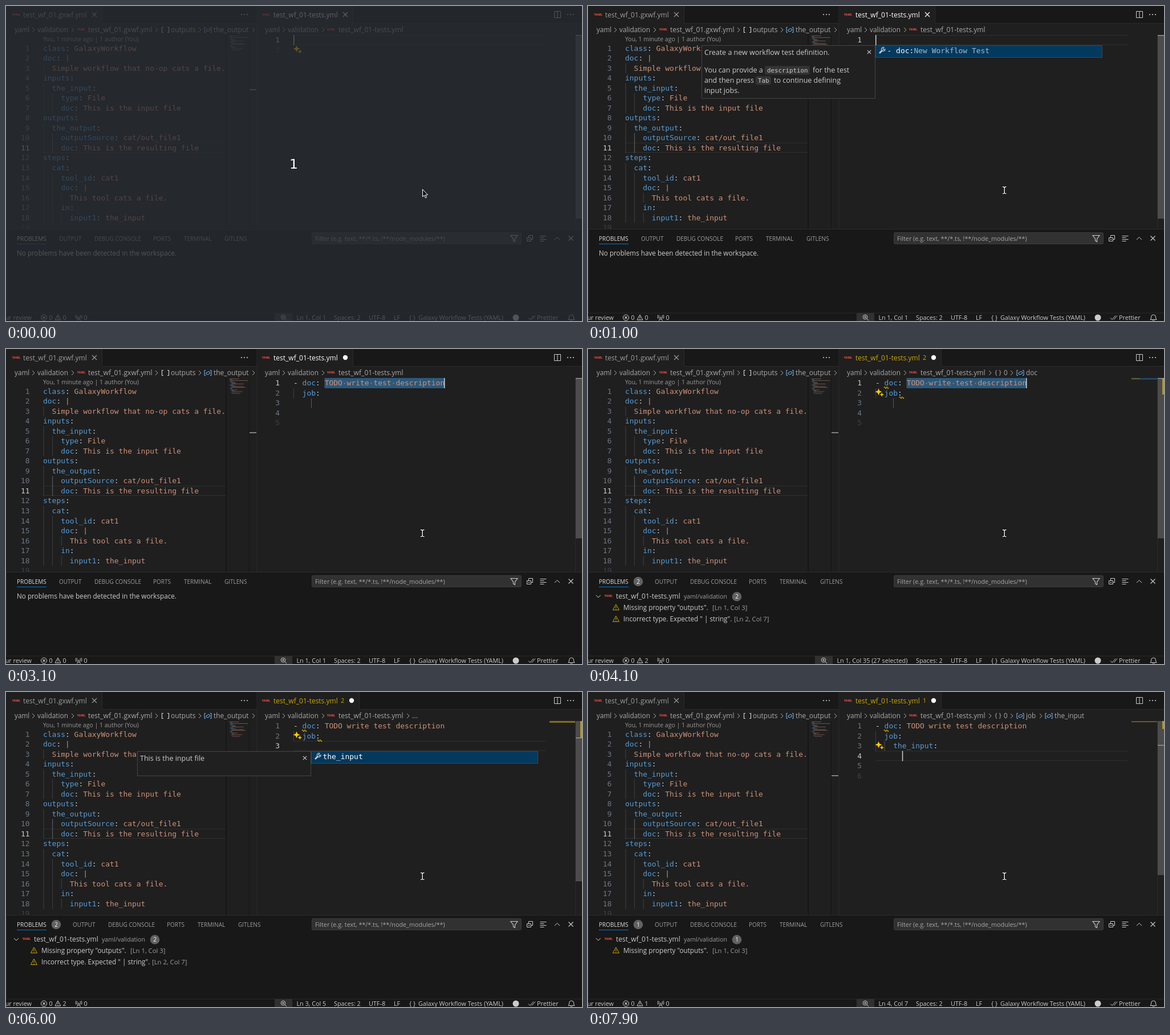
Animation, 1010 px wide and 554 px high, one loop 8000 ms. Source, as an HTML page:

```html
<!DOCTYPE html>
<html lang="en">
<head>
<meta charset="utf-8">
<title>Workflow test editing</title>
<style>
html, body { margin: 0; width: 100%; height: 100%; overflow: hidden; background: #1f1f1f; }
svg { display: block; width: 1010px; height: 554px; }
text { white-space: pre; }
</style>
</head>
<body>
<svg id="stage" viewBox="0 0 1010 554"></svg>
<script>
const LOOP = 8000;
const UI = "'Open Sans', sans-serif", MONO = "'DejaVu Sans Mono', monospace";
const FG = '#cccccc', DIM = '#9d9d9d', CRUMB = '#a9a9a9', BLUE = '#569cd6', STR = '#ce9178', WARN = '#cca700';
const CHAR = 7.8, ROW = 17.53;
const timed = [];
let cur = document.getElementById('stage');

function el(tag, attrs) {
  const e = document.createElementNS('http://www.w3.org/2000/svg', tag);
  for (const k in attrs) e.setAttribute(k, attrs[k]);
  cur.appendChild(e);
  return e;
}
// Group shown only inside the given [start, end, start, end, ...] spans.
function during(spans, build) {
  const outer = cur;
  cur = el('g', {});
  timed.push([cur, spans]);
  build();
  cur = outer;
}
const rect = (x, y, w, h, fill, more) => el('rect', { x, y, width: w, height: h, fill, ...more });
const line = (d, stroke = FG, width = 1, more) => el('path', { d, stroke, fill: 'none', 'stroke-width': width, ...more });
const dot = (x, y, r, fill) => el('circle', { cx: x, cy: y, r, fill });
// y is the middle of the capitals
function text(x, y, s, fill = FG, size = 11.7, more) {
  const e = el('text', { x, y: Math.floor(y + size * .36), fill, 'font-size': size, 'font-family': UI, ...more });
  e.textContent = s;
  return e;
}
const mono = (x, y, s, fill, size = 12.96, more) => text(x, y, s, fill, size, { 'font-family': MONO, ...more });

function code(x, y, s) {
  const e = mono(x, y, '', FG);
  const m = s.match(/^(\s*(?:- )?)(\w+)(:)(.*)$/);
  const parts = m ? [[m[1], FG], [m[2], BLUE], [m[3], FG], [m[4], STR]] : [[s, STR]];
  for (const [str, fill] of parts) {
    const span = document.createElementNS(e.namespaceURI, 'tspan');
    span.setAttribute('fill', fill);
    span.textContent = str;
    e.appendChild(span);
  }
}

// Icons
const chevron = (x, y, c = CRUMB) => line(`M${x - 2} ${y - 4}l4 4l-4 4`, c);
const cross = (x, y, c = FG, r = 4) => line(`M${x - r} ${y - r}l${2 * r} ${2 * r}m0 ${-2 * r}l${-2 * r} ${2 * r}`, c, 1.1);
const dots = (x, y, c = FG) => [-5, 0, 5].forEach(d => dot(x + d, y, 1.1, c));
const yaml = (x, y) => text(x, y, 'YAML', '#d8483e', 5, { 'text-anchor': 'middle', 'font-weight': 800 });
const triangle = (x, y, c, r = 5.5) => {
  line(`M${x} ${y - r}l${r} ${2 * r - 1}h${-2 * r}z`, c, 1, { 'stroke-linejoin': 'round' });
  line(`M${x} ${y - 2}v3.4m0 1v1.2`, c);
};
const badge = (x, y, n) => {
  dot(x, y, 8.3, '#616161');
  text(x, y + .4, n, '#f8f8f8', 10, { 'text-anchor': 'middle' });
};
const symbol = (x, y) => {
  line(`M${x - 4} ${y - 4.5}h-2v9h2m8 -9h2v9h-2`, '#75beff');
  line(`M${x - 3} ${y}l4 -2.5l2.5 1v2.5l-4 2l-2.5 -1z`, '#75beff');
};
const star = (x, y, r) => {
  const q = r * .28;
  el('path', { fill: '#ffcc00', d: `M${x} ${y - r}l${q} ${r - q}l${r - q} ${q}l${q - r} ${q}l${-q} ${r - q}l${-q} ${q - r}l${q - r} ${-q}l${r - q} ${-q}z` });
};
const sparkle = y => { star(509.5, y - 1.3, 6); star(515.3, y + 3.8, 3.8); };
const squiggle = (x, y) => line(`M${x} ${y}q1 -3 2 0t2 0t2 0t2 0`, WARN, 1.2);
const zoom = x => {
  rect(x, 540, 31, 14, '#313131');
  el('circle', { cx: x + 15, cy: 547, r: 3.8, stroke: FG, fill: 'none' });
  line(`M${x + 18} 550l3 3m-8 -6h4m-2 -2v4`);
};

function popup(x, y, docHeight, drawRow, drawDoc) {
  rect(x + .5, y + .5, 397, 21, '#04395e', { stroke: '#454545' });
  line(`M${x + 7} ${y + 14}l5 -5`, FG, 2.6);
  line(`M${x + 15} ${y + 4}a3.3 3.3 0 1 0 2 3l-2.5 1l-1.5 -1.5z`, FG, 1.2);
  drawRow();
  rect(x - 304.5, y + .5, 304, docHeight - 1, '#202020', { stroke: '#454545' });
  drawDoc(x - 300, y + 13);
  cross(x - 11, y + 12, FG, 3.2);
}
const docText = (x, y, s) => text(x, y, s, FG, 12.5);

// Left editor
const source = `class: GalaxyWorkflow
doc: |
  Simple workflow that no-op cats a file.
inputs:
  the_input:
    type: File
    doc: This is the input file
outputs:
  the_output:
    outputSource: cat/out_file1
    doc: This is the resulting file
steps:
  cat:
    tool_id: cat1
    doc: |
      This tool cats a file.
    in:
      input1: the_input`.split('\n');

const lineNo = (x, y, n, fill) => mono(x, y, n, fill, 12.96, { 'text-anchor': 'end' });

rect(0, 0, 1010, 554, '#1f1f1f');
rect(0, 0, 1010, 30, '#181818');
rect(0, 30, 1010, 1, '#2b2b2b');
rect(0, 0, 168, 31, '#1f1f1f');
rect(168, 0, 1, 31, '#2b2b2b');
yaml(18, 16);
text(30, 16, 'test_wf_01.gxwf.yml', DIM, 12);
cross(155, 15, DIM);
dots(418, 15);

text(15, 42, 'yaml', CRUMB);
text(55, 42, 'validation', CRUMB, 11.85);
yaml(132, 42);
text(144, 42, 'test_wf_01.gxwf.yml', CRUMB, 12.1);
line('M276 37.5h-2.5v9h2.5m7 -9h2.5v9h-2.5', FG, 1.2);
text(289, 42, 'outputs', CRUMB, 12);
symbol(354, 42);
text(364, 42, 'the_output', CRUMB, 12);
[48, 117, 264, 340, 434].forEach(x => chevron(x, 42));
text(65, 58.5, 'You, 1 minute ago | 1 author (You)', '#999999', 10.5);

rect(65, 240.5, 320, 1, '#303030');
rect(65, 257, 320, 1, '#303030');
source.forEach((s, i) => {
  const y = 74.5 + i * ROW, indent = s.search(/\S/);
  for (let k = 0; k < indent; k += 2)
    rect(65.5 + k * CHAR, y - ROW / 2, 1, ROW, k == 2 && (i == 9 || i == 10) ? '#666666' : '#404040');
  code(65, y, s);
  lineNo(41.5, y, i + 1, i == 10 ? FG : '#6e7681');
  rect(392 + indent * .8, 52 + i * 1.5, (s.length - indent) * .8, 1, s.includes(': ') || !s.includes(':') ? STR : BLUE, { opacity: .45 });
});
lineNo(41.5, 74.5 + 18 * ROW, 19, '#3c4046');
rect(385, 51, 2, 341, '#161616');
rect(426, 51, 1, 341, '#151515');
rect(427, 146.5, 12, 1.5, '#a0a0a0');
rect(439.5, 0, 1, 392, '#2b2b2b');

// Right editor
const rowY = n => 60 + (n - 1) * ROW;

function tab(right, color, count) {
  rect(440, 0, right - 440, 31, '#1f1f1f');
  rect(right, 0, 1, 31, '#2b2b2b');
  yaml(456, 16);
  text(469, 16, 'test_wf_01-tests.yml', color, 12);
  if (count) text(587, 16, count, color, 11);
}
during([0, 3100], () => { tab(608, '#ffffff'); cross(595, 15, '#ffffff'); });
during([3100, 3200], () => { tab(608, '#ffffff'); dot(595, 15, 4.2, '#ffffff'); });
during([3200, 7100], () => { tab(619, WARN, 2); dot(606, 15, 4.2, '#ffffff'); });
during([7100, LOOP], () => { tab(619, WARN, 1); dot(606, 15, 4.2, '#ffffff'); });
line('M961.5 9.5h11v11h-11zm5.5 0v11');
dots(990, 15);

text(454, 42, 'yaml', CRUMB);
text(494, 42, 'validation', CRUMB, 11.85);
yaml(570, 42);
text(583, 42, 'test_wf_01-tests.yml', CRUMB, 12.1);
chevron(487, 42);
chevron(556, 42);
during([3200, LOOP], () => chevron(705, 42));
during([3200, 3700, 4600, 7600], () => text(712, 42, '…', CRUMB, 13));
during([3700, 4600, 7600, LOOP], () => {
  text(719, 41.5, '{ }', CRUMB, 11.5, { 'text-anchor': 'middle' });
  text(729, 42, '0', CRUMB);
  chevron(743, 42);
  symbol(758, 42);
});
during([3700, 4600], () => text(768, 42, 'doc', CRUMB));
during([7600, LOOP], () => {
  text(768, 42, 'job', CRUMB);
  chevron(794, 42);
  symbol(808, 42);
  text(818, 42, 'the_input', CRUMB, 11.8);
});

// [active row, last row, spans]
[[1, 2, [0, 3100]], [1, 5, [3100, 4500]], [3, 5, [4500, 7400]], [4, 6, [7400, LOOP]]].forEach(([active, last, spans]) =>
  during(spans, () => {
    for (let n = 1; n <= last; n++)
      lineNo(480, rowY(n), n, n == active ? FG : n == last ? '#3c4046' : '#6e7681');
    if (last == 5 && active == 1) return;
    rect(504, rowY(active) - 9, 442, 1, '#303030');
    rect(504, rowY(active) + 7.5, 442, 1, '#303030');
  }));

during([3100, 4500], () => {
  rect(558.5, 51, 210, 18, '#2d587a');
  rect(535, 87, 1, 17, '#5a5a5a');
});
during([3100, LOOP], () => {
  rect(504, 69, 1, ROW, '#404040');
  code(504, rowY(1), '- doc: TODO write test description');
  code(504, rowY(2), '  job:');
});
during([3100, 4500], () => [11, 17, 22].forEach(c => dot(504 + (c + .5) * CHAR, 60.5, .9, '#8098a8')));
during([3200, LOOP], () => squiggle(519, 68));
during([3200, 7100], () => squiggle(546, 85.5));
during([6900, LOOP], () => {
  rect(504, 86.5, 1, ROW, '#404040');
  rect(519.5, 86.5, 1, ROW, '#505050');
});
during([6900, 7000], () => mono(504, rowY(3), '    the_input:', FG));
during([7000, LOOP], () => code(504, rowY(3), '    the_input:'));
during([0, 3100, 3200, 7200], () => sparkle(76.5));
during([7900, LOOP], () => sparkle(94));

// Minimap, scrollbar and ruler
during([3200, 4500], () => {
  rect(953, 51.5, 45, 2, '#2a597c');
  rect(953, 51.5, 14, 1, '#8c7714');
});
during([4500, 7100], () => rect(953, 51, 45, 3, '#80701a'));
during([7100, LOOP], () => rect(953, 51.5, 45, 1.5, '#80701a'));
rect(998, 51, 1, 341, '#2b2b2b');
[[374, [0, 3100]], [333, [3100, 7400]], [322, [7400, LOOP]]].forEach(([end, spans]) =>
  during(spans, () => rect(999, 51, 11, end - 51, '#4c4c4c')));
during([3200, 7100], () => rect(1007, 51, 3, 29, '#b99a12'));
during([7100, LOOP], () => rect(1007, 51, 3, 14, '#b99a12'));
[[51, [0, 4500]], [80, [4500, 7400]], [93, [7400, LOOP]]].forEach(([y, spans]) =>
  during(spans, () => rect(999, y, 11, 1.3, '#a0a0a0')));

// Carets
const caret = (col, row, spans) => during(spans, () => rect(504 + col * CHAR, rowY(row) - 9, 1.5, 18, '#d0d0d0'));
caret(0, 1, [0, 200, 600, 1200, 1600, 2100, 2600, 3100]);
caret(33.85, 1, [3100, 3600, 4100, 4500]);
caret(4, 3, [4500, 5000, 5500, 6000, 6500, 6900]);
caret(14, 3, [6900, 7400]);
caret(6, 4, [7400, LOOP]);

// Suggestions
during([1000, 3100], () => popup(504, 69, 94,
  () => {
    mono(524.5, 78.5, '- doc:', '#ffffff');
    mono(571.5, 78.5, 'New Workflow Test', '#a5b9c8');
  },
  (x, y) => {
    const chip = (cx, cy, w, s) => {
      rect(cx, cy - 8, w, 15, '#343434', { rx: 3 });
      mono(cx + 4, cy, s, FG, 10.8);
    };
    docText(x, y, 'Create a new workflow test definition.');
    docText(x, y + 31, 'You can provide a');
    chip(310, y + 31.5, 79, 'description');
    docText(394, y + 31, 'for the test');
    docText(x, y + 49, 'and then press');
    chip(294, y + 49.5, 27, 'Tab');
    docText(326, y + 49, 'to continue defining');
    docText(x, y + 67, 'input jobs.');
  }));
during([5800, 6900], () => popup(535, 104, 44,
  () => mono(555.5, 113.5, 'the_input', '#ffffff'),
  (x, y) => docText(x, y, 'This is the input file')));

// Panel
rect(0, 392, 1010, 162, '#181818');
rect(0, 392, 1010, 1, '#2b2b2b');
rect(0, 392, 1, 148, '#2b2b2b');
text(19, 409.5, 'PROBLEMS', '#dddddd', 10);
rect(19, 418, 52, 1, '#0078d4');
const panelTabs = xs => ['OUTPUT', 'DEBUG CONSOLE', 'PORTS', 'TERMINAL', 'GITLENS'].forEach((s, i) => text(xs[i], 409.5, s, DIM, 10));
during([0, 3200], () => {
  panelTabs([93, 155, 258, 312, 383]);
  text(19, 435, 'No problems have been detected in the workspace.');
});
during([3200, LOOP], () => {
  panelTabs([117, 179, 282, 336, 407]);
  line('M14 433l4 4l4 -4');
  yaml(36, 435);
  text(49, 435, 'test_wf_01-tests.yml', FG, 12);
  text(168, 435.3, 'yaml/validation', DIM, 10.6);
});
const problem = (y, s, x, at) => {
  triangle(49, y - .5, WARN);
  text(62, y, s);
  text(x, y, at, DIM, 11.3);
};
during([3200, LOOP], () => problem(455, 'Missing property "outputs".', 218, '[Ln 1, Col 3]'));
during([3200, 7200], () => problem(475.5, 'Incorrect type. Expected " | string".', 256, '[Ln 2, Col 7]'));
during([3200, 7200], () => { badge(88, 409, 2); badge(261, 435.5, 2); });
during([7200, LOOP], () => { badge(88, 409, 1); badge(261, 435.5, 1); });

rect(536.5, 398.5, 367, 20, '#313131', { rx: 2, stroke: '#3c3c3c' });
text(542, 409.2, 'Filter (e.g. text, **/*.ts, !**/node_modules/**)', '#a5a5a5', 10.8);
line('M885 403.5h12l-4.5 6v5l-3 -1.5v-3.5z', FG, 1.1);
line('M913.5 407.5h7v6h-7zm3 0v-4h7v7h-3m-5 0h3');
line('M936.5 404.5h11m-11 3h7m-7 3h11m-11 3h7');
line('M962 411l4.5 -4.5l4.5 4.5');
cross(990.5, 408.5);

// Status bar
rect(0, 539.5, 1010, 1, '#2b2b2b');
const status = (x, s) => text(x, 548.5, s, FG, 10.8);
text(45, 548.5, 'ur review', FG, 10.8, { 'text-anchor': 'end' });
el('circle', { cx: 66.5, cy: 548, r: 5, stroke: FG, fill: 'none' });
cross(66.5, 548, FG, 2);
status(75.5, '0');
triangle(91, 548, FG, 5);
[[0, [0, 3200]], [2, [3200, 7100]], [1, [7100, LOOP]]].forEach(([n, spans]) => during(spans, () => status(99.5, n)));
line('M127.5 546.5l-3 7m3 -7l3 7m-4.5 -2.5h3M125 544q-1.5 2.5 0 5m5 -5q1.5 2.5 0 5M123 543q-2 3.5 0 7m9 -7q2 3.5 0 7', FG, .9);
status(136.5, '0');
[[471, 'Ln 1, Col 1', [0, 3200]], [398, 'Ln 1, Col 35 (27 selected)', [3200, 4600]],
 [471, 'Ln 3, Col 5', [4600, 7000]], [465, 'Ln 3, Col 15', [7000, 7500]],
 [471, 'Ln 4, Col 7', [7500, LOOP]]].forEach(([x, s, spans]) =>
  during(spans, () => { zoom(x); status(x + 38.5, s); }));
status(575, 'Spaces: 2');
status(636, 'UTF-8');
status(680, 'LF');
status(707, '{ }');
status(723, 'Galaxy Workflow Tests (YAML)');
dot(894, 548, 5.5, FG);
line('M916 548.5l3 3l6 -7m-3 7l6 -7');
status(931, 'Prettier');
line('M986 551.5h11l-1.5 -2.5v-2a4 4 0 0 0 -8 0v2zm4 1a1.5 1.5 0 0 0 3 0');

// Pointer and the opening countdown
during([100, LOOP], () => {
  const beam = 'M727 318q3 0 3.2 1.5q.2 -1.5 3.2 -1.5m-3.2 1.5v9m-3.2 1.5q3 0 3.2 -1.5q.2 1.5 3.2 1.5';
  line(beam, '#000000', 3);
  line(beam, '#ffffff', 1.4);
});
during([0, 100], () => {
  rect(0, 0, 1010, 554, '#272b32', { opacity: .75 });
  text(504.5, 278, '1', '#ffffff', 23.5, { 'font-family': "'DejaVu Sans', sans-serif", 'text-anchor': 'middle' });
  el('path', { d: 'M730.5 322.5v13l3 -2.7l2 4.7l2 -.9l-2 -4.5h4z', fill: '#111111', stroke: '#ffffff' });
});

const start = performance.now();
function frame() {
  const t = (performance.now() - start) % LOOP;
  for (const [g, spans] of timed) {
    let on = false;
    for (let i = 0; i < spans.length; i += 2) on = on || (t >= spans[i] && t < spans[i + 1]);
    g.style.display = on ? '' : 'none';
  }
  requestAnimationFrame(frame);
}
frame();
</script>
</body>
</html>
```
